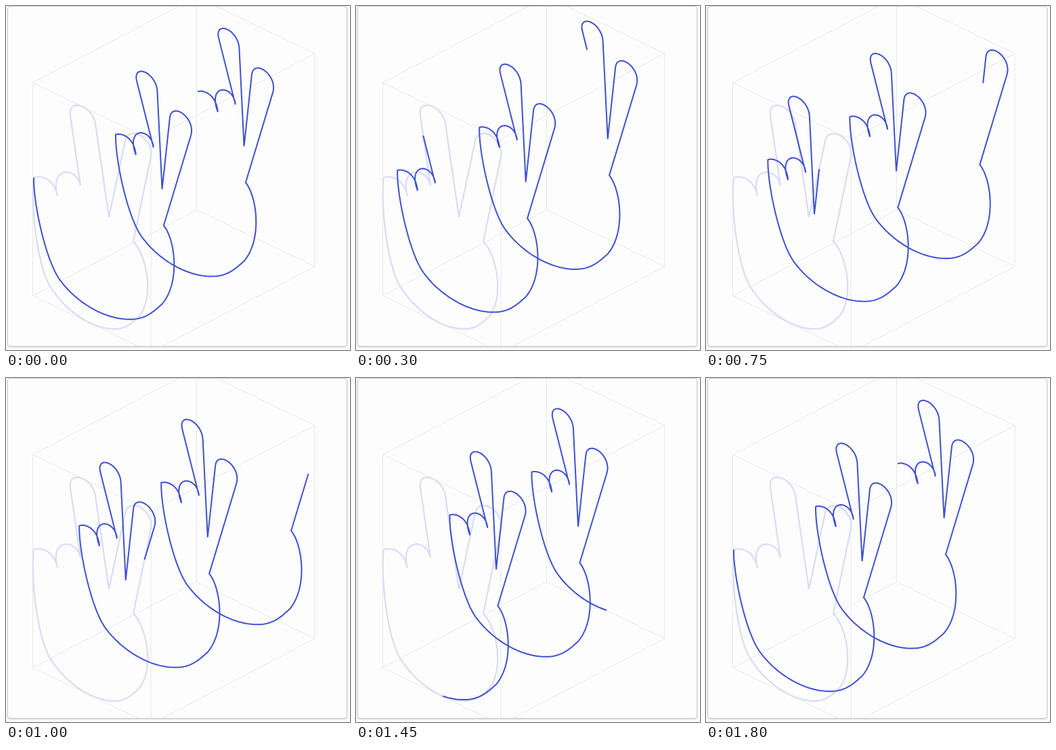
Recreate the animation shown at these times as an HTML page with a canvas. Size 508 px wide and 507 px high, loop 1.85 s.

```html
<!DOCTYPE html>
<html>
<head>
<meta charset="utf-8">
<title>Hand helix</title>
<style>
html, body { margin: 0; width: 100%; height: 100%; overflow: hidden; background: #fff; }
canvas { display: block; }
.card {
  position: absolute; left: 2px; top: 0; width: 500px; height: 500px;
  border: 1px solid #ccc; border-radius: 4px; overflow: hidden;
  background: #fdfdfd; box-shadow: 0 1px 3px rgba(0, 0, 0, .2);
}
</style>
</head>
<body>
<div class="card"><canvas width="500" height="500"></canvas></div>
<script>
const ctx = document.querySelector('canvas').getContext('2d');
const STEP = 50, FRAMES = 37, TURNS = 2;
const PITCH = { x: 121, y: -63.3 }; // shift per full turn
const WIDTH = { x: 174.5, y: 83.5 }, DEPTH = { x: 242, y: -126.5 }, HEIGHT = 314;

const mix = (a, b, k) => ({ x: a.x + (b.x - a.x) * k, y: a.y + (b.y - a.y) * k });

// Collects the points of one outline.
class Pen {
  constructor(x, y) { this.pts = [{ x, y }]; }
  get tip() { return this.pts[this.pts.length - 1]; }

  line(x, y) { this.pts.push({ x, y }); }

  curve(x1, y1, x2, y2, x, y) {
    const a = this.tip, b = { x: x1, y: y1 }, c = { x: x2, y: y2 }, d = { x, y };
    for (let i = 1; i <= 30; i++) {
      const t = i / 30, m = mix(b, c, t);
      const left = mix(mix(a, b, t), m, t), right = mix(m, mix(c, d, t), t);
      this.pts.push(mix(left, right, t));
    }
  }

  // Straight sides joined by a cap that continues both of them.
  finger(ax, ay, bx, by, endX, endY, cap) {
    const ahead = (x, y, from) => {
      const k = cap / Math.hypot(x - from.x, y - from.y);
      return [x + (x - from.x) * k, y + (y - from.y) * k];
    };
    const c1 = ahead(ax, ay, this.tip), c2 = ahead(bx, by, { x: endX, y: endY });
    this.line(ax, ay);
    this.curve(...c1, ...c2, bx, by);
    this.line(endX, endY);
  }
}

function drawHand() {
  const pen = new Pen(41, 253);
  pen.curve(46, 250, 70, 250, 76, 280);
  pen.curve(64, 235, 105, 237, 110, 265);
  pen.finger(95, 162, 132, 174, 152, 311, 28);
  pen.finger(176, 199, 214, 222, 188, 347, 26);
  pen.curve(207, 366, 220, 427, 197, 457);
  pen.curve(190, 463, 180, 476, 160, 476);
  pen.curve(125, 476, 85, 447, 64, 411);
  pen.curve(46, 380, 36, 292, 41, 253);
  return pen.pts;
}

// Phase is the share of length, measured on the unskewed face.
function setPhase(pts) {
  let len = 0;
  pts.forEach((p, i) => {
    if (i) {
      const dx = p.x - pts[i - 1].x, dy = p.y - pts[i - 1].y;
      len += Math.hypot(dx * 1.2, dy - dx * WIDTH.y / WIDTH.x);
    }
    p.u = len;
  });
  for (const p of pts) p.u /= len;
  return pts;
}

const outline = setPhase(drawHand());

function at(u) {
  const i = Math.max(1, outline.findIndex(p => p.u >= u));
  const a = outline[i - 1], b = outline[i];
  return mix(a, b, (u - a.u) / (b.u - a.u));
}

function helix(phase) {
  const place = (p, s) => ({ x: p.x + PITCH.x * s, y: p.y + PITCH.y * s });
  const head = at(phase);
  const pts = [place(head, 0)];
  for (let turn = 0; turn <= TURNS; turn++) {
    for (let i = outline.length - 1; i > 0; i--) {
      const s = phase - outline[i].u + turn;
      if (s > 0 && s < TURNS) pts.push(place(outline[i], s));
    }
  }
  pts.push(place(head, TURNS));
  return pts;
}

function stroke(pts, color, width) {
  ctx.beginPath();
  for (const p of pts) ctx.lineTo(p.x, p.y);
  ctx.strokeStyle = color;
  ctx.lineWidth = width;
  ctx.stroke();
}

function drawBox() {
  const corner = (w, h, d) => ({
    x: 39.5 + WIDTH.x * w + DEPTH.x * d,
    y: 113 + WIDTH.y * w + HEIGHT * h + DEPTH.y * d
  });
  const edge = (a, b) => stroke([corner(...a), corner(...b)], '#e8e8e8', 1);
  for (const i of [0, 1]) for (const j of [0, 1]) {
    edge([0, i, j], [1, i, j]);
    edge([i, 0, j], [i, 1, j]);
    edge([i, j, 0], [i, j, 1]);
  }
}

function draw(now) {
  const frame = Math.floor(now / STEP) % FRAMES;
  ctx.setTransform(1, 0, 0, 1, -3, -1);
  ctx.clearRect(0, 0, 508, 507);
  ctx.miterLimit = 4;
  drawBox();
  stroke(outline, '#d9dcf5', 2.2);
  stroke(helix(frame / (FRAMES - 1)), '#3f51d0', 2);
}

let begin;
function tick(now) {
  if (begin === undefined) begin = now;
  draw(now - begin);
  requestAnimationFrame(tick);
}
draw(0);
requestAnimationFrame(tick);
</script>
</body>
</html>
```
